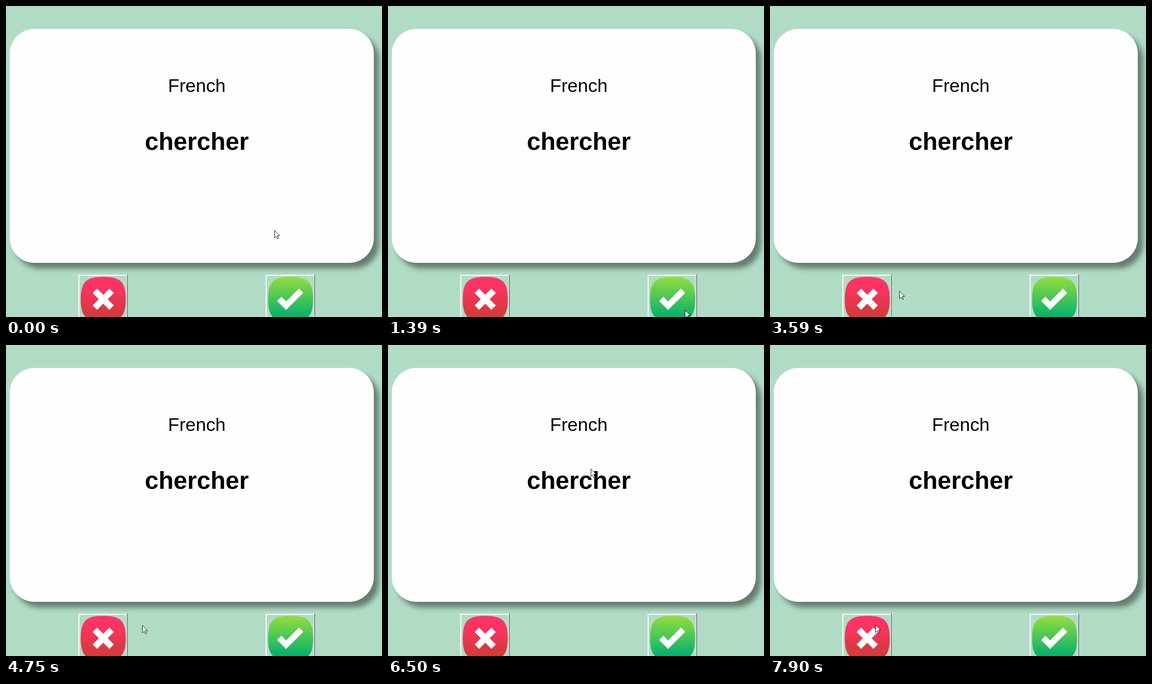
An HTML page that plays this animation: 803x666 px, repeating every 8 s.

```html
<!DOCTYPE html>
<html lang="en">
<head>
<meta charset="utf-8">
<title>Flash card</title>
<style>
  html, body { margin: 0; width: 100%; height: 100%; overflow: hidden; background: #b0dcc5; }
  svg { display: block; width: 803px; height: 666px; }
  text { font-family: "Liberation Sans", Arial, sans-serif; text-anchor: middle; }
  .card { fill: #fefefe; filter: drop-shadow(11px 12px 6px rgba(0, 0, 0, .43)); }
  .language { font-size: 39.5px; }
  .word { font-size: 52.6px; font-weight: bold; }
  .mark { fill: none; stroke: #fff; }
</style>
</head>
<body>
<svg viewBox="0 0 803 666">
  <defs>
    <linearGradient id="red" x2="0" y2="1">
      <stop offset=".08" stop-color="#ff3368"/>
      <stop offset=".3" stop-color="#f8345f"/>
      <stop offset=".75" stop-color="#d9393f"/>
      <stop offset="1" stop-color="#d13c3a"/>
    </linearGradient>
    <linearGradient id="green" x2="0" y2="1">
      <stop offset=".05" stop-color="#8cdb40"/>
      <stop offset=".85" stop-color="#0bb36b"/>
    </linearGradient>
    <g id="bevel">
      <rect width="106" height="106" fill="#696969"/>
      <rect width="105" height="105" fill="#e3e3e3"/>
      <rect x="1" y="1" width="104" height="104" fill="#a0a0a0"/>
      <rect x="1" y="1" width="103" height="103" fill="#fff"/>
      <rect x="2" y="2" width="102" height="102" fill="#f0f0f0"/>
      <rect x="3" y="3" width="100" height="100" fill="#b0dcc5"/>
    </g>
    <path id="tile" d="M5.7 53C5.7 16 16.7 5 53.7 5S101.7 16 101.7 53 90.7 101 53.7 101 5.7 90 5.7 53Z"/>
  </defs>

  <rect width="803" height="666" fill="#b0dcc5"/>
  <rect class="card" x="8" y="49" width="777.5" height="501" rx="53"/>
  <text class="language" x="407.5" y="184">French</text>
  <text class="word" x="407.5" y="308">chercher</text>

  <g transform="translate(154 575)">
    <use href="#bevel"/>
    <use href="#tile" fill="url(#red)"/>
    <path class="mark" stroke-width="13.5" d="M35.8 35.1l35.8 35.8M71.6 35.1l-35.8 35.8"/>
  </g>
  <g transform="translate(554 575)">
    <use href="#bevel"/>
    <use href="#tile" fill="url(#green)"/>
    <path class="mark" stroke-width="13" d="M29.6 52.2l14.6 14.6 32.2-32.2"/>
  </g>

  <path id="cursor" fill="#fff" stroke="#000" stroke-width=".95"
        d="M.5 .5V16.6L4.2 13.2 6.8 18.5 9 17.5 6.5 12.2 6.5 11.7H11.5Z"/>
</svg>
<script>
  const LOOP = 8000;
  const STEP = 137;
  const REST = [573, 480];

  // The pointer moves in strokes, each continuing from the last.
  // "via" bends the stroke into a curve; "ease" is the power of its progress.
  const strokes = [
    { start: 120, end: 1080, via: [394, 338], to: [588, 581] },
    { start: 1240, end: 1390, to: [634, 651] },
    { start: 2380, end: 3340, via: [520, 598], to: [302, 613], ease: 6.4 },
    { start: 3470, end: 3590, to: [276, 610] },
    { start: 3890, end: 4020, to: [269, 614] },
    { start: 4480, end: 4610, to: [201, 621] },
    { start: 4750, end: 5430, via: [358, 632], to: [358, 403], ease: .59 },
    { start: 5570, end: 6500, via: [606, 127], to: [433, 265], ease: 2.5 },
    { start: 6630, end: 6780, to: [455, 272] },
    { start: 7230, end: 7900, via: [475, 470], to: [225, 599] }
  ];

  const mix = (a, b, t) => a.map((v, i) => v + (b[i] - v) * t);

  const curve = (from, via, to, t) => mix(mix(from, via, t), mix(via, to, t), t);

  function pointerAt(now) {
    let from = REST;
    for (const { start, end, via, to, ease = 1 } of strokes) {
      if (now < start) break;
      const gaps = Math.round((end - start) / STEP);
      const timeOf = i => Math.floor((start + (end - start) * i / gaps) / 10) * 10;
      let step = gaps;
      while (timeOf(step) > now) step--;
      const t = ((step + 1) / (gaps + 1)) ** ease;
      const point = via ? curve(from, via, to, t) : mix(from, to, t);
      if (step < gaps) return point;
      from = to;
    }
    return from;
  }

  const cursor = document.getElementById("cursor");

  function draw() {
    const [x, y] = pointerAt(performance.now() % LOOP).map(Math.round);
    cursor.setAttribute("transform", `translate(${x} ${y})`);
    requestAnimationFrame(draw);
  }
  draw();
</script>
</body>
</html>
```
